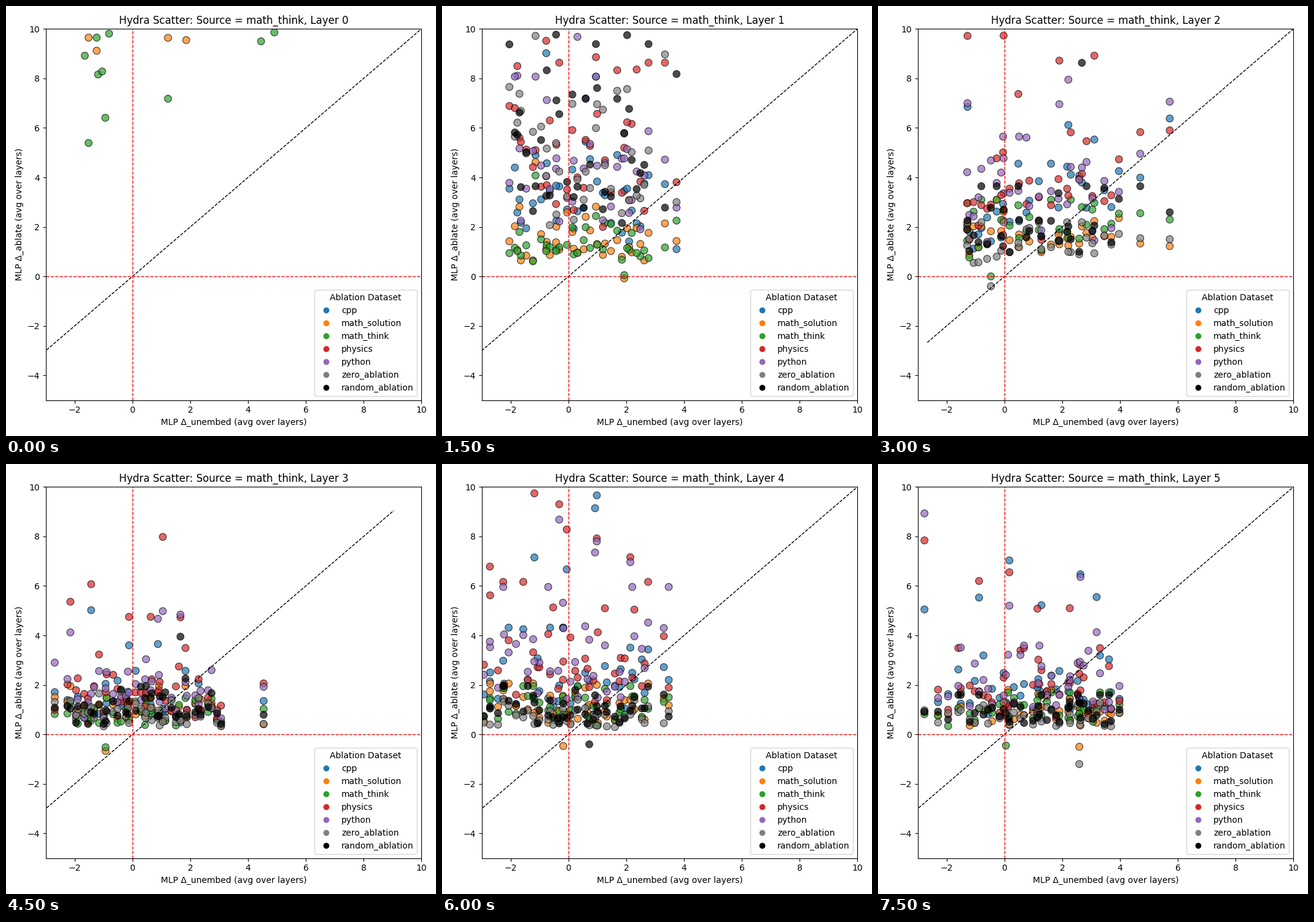
These frames come from a looping animation (700x700 px, 8 s). A matplotlib script:

```python
import numpy as np
import matplotlib.pyplot as plt
from matplotlib.animation import FuncAnimation
from matplotlib.colors import to_rgba
from matplotlib.lines import Line2D

COLORS = {
    "cpp": "tab:blue",
    "math_solution": "tab:orange",
    "math_think": "tab:green",
    "physics": "tab:red",
    "python": "tab:purple",
    "zero_ablation": "gray",
    "random_ablation": "black",
}
FRAMES, INTERVAL, FRAMES_PER_LAYER = 16, 500, 3
FAR = 20


def make_layer(count, span, skew, medians, sigma, ends=(-FAR, FAR), **marks):
    """Shared x columns with a log-normal band per series, plus landmarks."""
    rng = np.random.default_rng(count)
    u = (np.arange(count) + rng.random(count)) / max(count, 1)
    low, high = span
    landmark_xs = {x for pairs in marks.values() for x, _ in pairs}
    xs = np.append(low + (high - low) * u ** skew, sorted(landmark_xs))
    if not count:
        xs = xs[:0]
    shared = rng.normal(size=xs.size)
    points, colors = [], []
    for (name, color), median in zip(COLORS.items(), medians):
        fixed = marks.get(name, [])
        taken = [x for x, _ in fixed]
        z = np.clip(0.6 * shared + 0.8 * rng.normal(size=xs.size), -2, 1.5)
        band = zip(xs, median * np.exp(sigma * z))
        series = fixed + [(x, y) for x, y in band if x not in taken]
        points += series
        colors += [to_rgba(color, 0.7)] * len(series)
    return np.array(points), colors, ends


LAYERS = [
    make_layer(
        0, (0, 0), 1, [0] * 7, 0,
        math_solution=[(-1.52, 9.65), (-1.24, 9.12), (1.23, 9.64),
                       (1.86, 9.55)],
        math_think=[(-1.24, 9.65), (-0.81, 9.81), (-1.65, 8.92),
                    (-1.19, 8.16), (-1.05, 8.28), (-0.94, 6.41),
                    (-1.52, 5.39), (1.23, 7.18), (4.45, 9.5), (4.91, 9.86)],
    ),
    make_layer(
        28, (-2.2, 2.9), 1, [2.9, 1.5, 1.3, 4.6, 4.3, 4.8, 5], 0.42,
        ends=(-3.6, FAR),
        cpp=[(-.77, 9.02), (.95, 8.07), (3.74, 1.1)],
        math_solution=[(1.93, -.08), (-1.14, 4.62)],
        math_think=[(1.93, .05), (-1.14, 4.08)],
        physics=[(-1.77, 8.5), (-.77, 9.52), (.95, 8.86), (2.36, 8.36)],
        python=[(-1.77, 8.11), (.31, 9.68), (3.74, 2.78)],
        zero_ablation=[(-1.14, 9.72), (2.03, 7.57), (3.34, 8.97)],
        random_ablation=[(-.43, 9.77), (2.03, 9.75)],
    ),
    make_layer(
        25, (-1.3, 4.1), 1.3, [2.5, 1.7, 1.7, 3.3, 3.1, 1.2, 2], 0.4,
        ends=(-2.67, FAR),
        cpp=[(-1.28, 6.85), (2.21, 6.12), (3.11, 5.53), (5.72, 6.38)],
        math_think=[(-.47, 0)],
        physics=[(-1.28, 9.72), (-.03, 9.73), (.48, 7.37), (1.9, 8.72),
                 (3.11, 8.92), (4.7, 5.83), (5.72, 5.9)],
        python=[(-1.28, 7), (1.9, 6.96), (2.21, 7.95), (5.72, 7.06)],
        zero_ablation=[(-.47, -.4)],
        random_ablation=[(2.68, 8.63)],
    ),
    make_layer(
        34, (-2.25, 3.15), 1, [1.25, .95, .95, 1.7, 1.7, .85, 1.1], 0.48,
        ends=(-FAR, 9.05),
        cpp=[(-1.43, 5.02), (-.12, 3.6), (.88, 3.65)],
        math_solution=[(-.93, -.67)],
        math_think=[(-.93, -.52)],
        physics=[(1.05, 7.98), (-1.43, 6.07), (-2.15, 5.36), (-.12, 4.75),
                 (.63, 4.75), (1.66, 4.73), (4.54, 2.06)],
        python=[(-2.69, 2.9), (-2.15, 4.12), (.88, 4.67), (1.05, 4.98),
                (1.66, 4.84)],
        random_ablation=[(1.66, 3.95)],
    ),
    make_layer(
        35, (-3, 2.9), .95, [2.1, 1, .95, 3, 2.9, .7, .95], 0.48,
        cpp=[(-1.18, 7.15), (-.06, 6.67), (.92, 9.14), (.98, 9.66)],
        math_solution=[(-.18, -.47)],
        physics=[(-1.18, 9.74), (-.32, 9.3), (-.06, 8.28), (-2.72, 6.78),
                 (.98, 7.92), (2.14, 7.16), (3.3, 3.97), (3.47, 1.89)],
        python=[(-.32, 8.68), (.92, 7.35), (.98, 7.8), (2.14, 6.96),
                (3.3, 4.3)],
        random_ablation=[(.72, -.4)],
    ),
    make_layer(
        33, (-2.5, 3.8), .8, [1.6, .9, .85, 1.75, 1.8, .65, .8], 0.46,
        cpp=[(-2.77, 5.05), (-.88, 5.53), (.17, 7.03), (1.28, 5.22),
             (2.63, 6.47), (3.19, 5.55)],
        math_solution=[(2.59, -.5)],
        math_think=[(.05, -.45)],
        physics=[(-2.77, 7.84), (-.88, 6.2), (.17, 6.55), (1.14, 5.08),
                 (2.26, 5.1), (3.98, 1.35)],
        python=[(-2.77, 8.93), (.17, 5.2), (2.63, 6.36), (3.19, 4.13)],
        zero_ablation=[(2.59, -1.2)],
    ),
]

fig, ax = plt.subplots(figsize=(7, 7), dpi=100)
dots = ax.scatter([], [], s=70, linewidths=0.8, edgecolors=[to_rgba("k", 0.7)])
diagonal, = ax.plot([], [], "k--", lw=1)
ax.axhline(0, color="red", ls="--", lw=1)
ax.axvline(0, color="red", ls="--", lw=1)
ax.set(xlim=(-3, 10), ylim=(-5, 10),
       xlabel="MLP Δ_unembed (avg over layers)",
       ylabel="MLP Δ_ablate (avg over layers)")
title = ax.set_title("Hydra Scatter: Source = math_think, Layer 0")
handles = [Line2D([0], [0], marker="o", color="w", label=name,
                  markerfacecolor=color, markersize=8)
           for name, color in COLORS.items()]
ax.legend(handles=handles, title="Ablation Dataset", loc="lower right")
fig.tight_layout()


def draw(frame):
    n = frame // FRAMES_PER_LAYER
    points, colors, ends = LAYERS[n]
    dots.set_offsets(points)
    dots.set_facecolor(colors)
    diagonal.set_data(ends, ends)
    title.set_text(f"Hydra Scatter: Source = math_think, Layer {n}")
    return dots, diagonal, title


anim = FuncAnimation(fig, draw, frames=FRAMES, interval=INTERVAL,
                     init_func=lambda: draw(0), repeat=True, repeat_delay=0,
                     blit=False)
plt.show()
```
